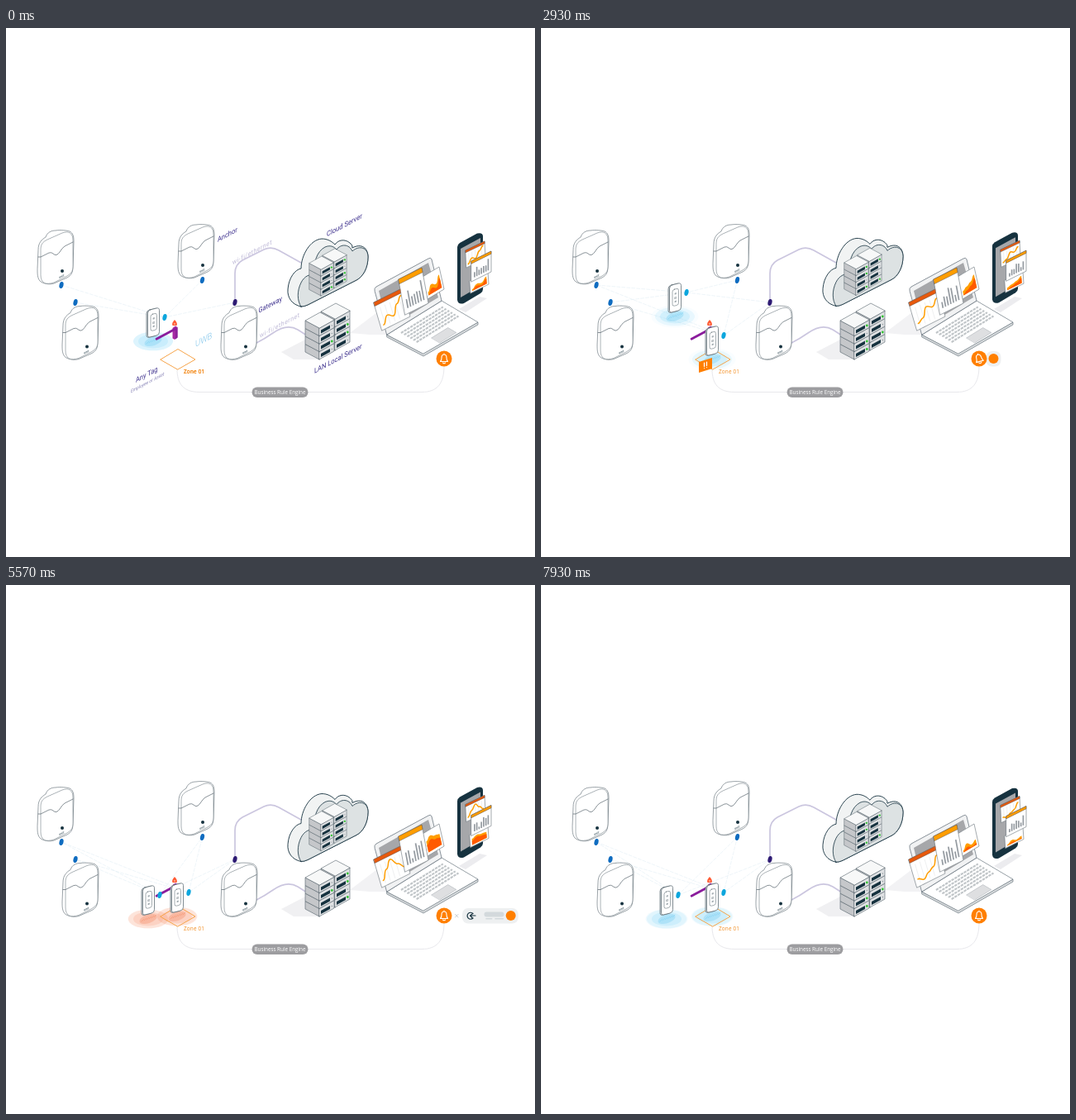
An HTML page for the animation above (8000 ms loop, 640 by 640 pixels).

```html
<!DOCTYPE html>
<html lang="en">
<head>
<meta charset="utf-8">
<title>Zone access diagram</title>
<style>
html, body { margin: 0; width: 100%; height: 100%; overflow: hidden; background: #fff; }
svg { display: block; width: 100vw; height: 100vh; font-family: Roboto, "Open Sans", sans-serif; }
.win * { vector-effect: non-scaling-stroke; }
</style>
</head>
<body>
<svg id="stage" viewBox="0 0 640 640" stroke-linejoin="round" stroke-linecap="round"></svg>
<script>
const LOOP = 8000, BOB_PERIOD = 3465;
const INK = '#56646c', NAVY = '#16323f', ORANGE = '#ff7f00', AMBER = '#ff9d00', RUST = '#e8590c';

const clamp = v => Math.max(0, Math.min(1, v));
const ramp = (t, from, to) => clamp((t - from) / (to - from));
const ease = p => p < .5 ? 2 * p * p : 1 - 2 * (1 - p) ** 2;
const glide = (t, from, to) => ease(ramp(t, from, to));
const mix = (a, b, p) => a + (b - a) * p;
const mixAll = (a, b, p) => a.map((v, i) => mix(v, b[i], p));
const repeat = (n, fn) => Array.from({ length: n }, (_, i) => fn(i)).join('');

const group = (content, attrs) => `<g ${attrs}>${content}</g>`;
const at = (x, y, content) => group(content, `transform="translate(${x} ${y})"`);
const poly = (points, fill, stroke = 'none', width = .8) =>
  `<polygon points="${points}" fill="${fill}" stroke="${stroke}" stroke-width="${width}"/>`;
const path = (d, fill, stroke = 'none', width = 1, extra = '') =>
  `<path d="${d}" fill="${fill}" stroke="${stroke}" stroke-width="${width}" ${extra}/>`;
const disc = (x, y, r, fill) => `<circle cx="${x}" cy="${y}" r="${r}" fill="${fill}"/>`;
const node = (x, y, fill) =>
  `<ellipse cx="${x}" cy="${y}" rx="2.5" ry="4" fill="${fill}" transform="rotate(14 ${x} ${y})"/>`;
const isoText = (x, y, size, fill, text, extra = '') =>
  `<text transform="matrix(.866 -.46 0 1 ${x} ${y})" font-size="${size}" fill="${fill}" ${extra}>${text}</text>`;

// ---- devices ----
const anchor = (x, y) => at(x, y,
  path('M1 24C1 16 5 12 10 9C12 3 17 1 22 1C28 0 36 1 39 2C43 4 44 8 44 14L43 44C43 52 41 55 36 58L20 65C14 67 6 65 3 62C0 58 0 54 0 48Z', '#fff', INK, .6) +
  path('M4 24C4 18 6 15 12 12L30 4C38 1 43 4 43 13V42C43 50 42 52 36 56L20 64C10 67 4 65 4 55Z', '#fff', INK, .5) +
  path('M1 33H4L14 28Q17 27 19 29Q23 33 27 27Q30 22 33 20L43 15', 'none', INK, .7) +
  disc(30, 50, 2, NAVY) +
  `<text transform="matrix(.9 -.35 0 1 26.3 59)" font-size="4" fill="${NAVY}">unit</text>`);

function stack(x, y, seed, t) {
  const layer = i => {
    const b = -9.5 * i, lit = Math.sin(t / 260 + seed * 2.7 + i * 4.1) > .1;
    return poly([0, b, -17, b - 9, -17, b - 18.5, 0, b - 9.5], '#c5c7ca', INK, .6) +
      poly([0, b, 18, b - 10, 18, b - 19.5, 0, b - 9.5], '#dfe1e3', INK, .6) +
      poly([2, b - 2.9, 13, b - 9, 13, b - 13, 2, b - 6.9], NAVY) +
      (lit ? disc(15.3, b - 12.5, 1.4, '#35c335') : disc(15.3, b - 12.5, .7, '#8d979c'));
  };
  return at(x, y, repeat(4, layer) + poly([0, -38, -17, -47, 1, -57, 18, -48], '#f7f8f8', INK, .6));
}
const servers = (seed, t) => stack(19, -11, seed, t) + stack(0, 0, seed + 2, t);

const cloud =
  path('M357 337C346 335 340 326 341 316C342 302 350 292 357 291C357 275 368 256 382 255C389 255 394 258 398 262C402 256 410 255 416 260Q420 263 419 266C430 260 438 266 438 277C438 290 432 301 424 305L365 335Q361 337 357 337Z', '#f1f3f3', NAVY, .9) +
  path('M357 337C352 330 352 318 357 308C361 300 368 297 374 299C371 285 376 270 386 265C393 262 397 265 400 268C405 261 415 261 419 270C428 262 438 266 438 277C438 290 432 301 424 305L365 335Q361 337 357 337Z', '#dde2e3', NAVY, .8);

// ---- charts ----
const TIMES = [0, 1710, 2930, 4570, 5570, 6930, 7930];
const LINES = [[.85, .6, .72, .4, .2], [.85, .55, .8, .45, .3], [.8, .7, .4, .5, .3], [.8, .6, .3, .5, .75],
  [.8, .5, .25, .5, .7], [.8, .5, .25, .45, .6], [.75, .85, .7, .6, .3]];
const AREAS = [[.75, .5, .6, .3], [.8, .5, .6, .3], [.7, .6, .5, .3], [.4, .25, .35, .4],
  [.4, .25, .35, .4], [.45, .25, .4, .4], [.8, .6, .75, .65]];
function sample(frames, t) {
  let i = TIMES.findLastIndex(time => time <= t);
  i = Math.min(i, TIMES.length - 2);
  return mixAll(frames[i], frames[i + 1], glide(t, TIMES[i], TIMES[i + 1]));
}
function smooth(values, shift = 0) {
  const step = .8 / (values.length - 1);
  return values.map((v, i) => {
    const x = .1 + i * step, y = v + shift;
    return i ? `C${x - step / 2} ${values[i - 1] + shift} ${x - step / 2} ${y} ${x} ${y}` : `M${x} ${y}`;
  }).join('');
}
const lineChart = t =>
  repeat(5, i => path(`M${.15 + i * .17} .25V.9`, 'none', '#dcdfe1', .5)) +
  path(smooth(sample(LINES, t)), 'none', AMBER, 1.5);
const barChart = t => repeat(7, i => {
  const h = .25 + .1 * Math.sin(i * 2.2) + .025 * i + .1 * Math.sin(t / 700 + i * 1.3);
  return path(`M${.16 + i * .115} .86v${-h}`, 'none', '#959ba1', 1.7, 'stroke-linecap="butt"');
});
function areaChart(t) {
  const v = sample(AREAS, t);
  return path(smooth(v) + 'V.88H.1Z', AMBER) + path(smooth(v.map(y => Math.min(y + .16, .85))) + 'V.88H.1Z', '#ff5a00');
}
// A unit square carried onto the parallelogram spanned by u and v.
const panel = (x, y, u, v, header, chart) => group(
  path('M0 0H1V1H0Z', '#fff', '#7d868c', .7) + (header ? path('M0 0H1V.13H0Z', header, '#5a4a40', .5) : '') + chart,
  `class="win" transform="matrix(${u} ${v} ${x} ${y})"`);

const onBase = (u, v) => [461 + 66 * u + 44 * v, 371 - 41 * u + 26 * v];
const laptop =
  poly([461, 371, 505, 393, 571, 356, 571, 359, 505, 397, 461, 374], '#d9dcde', '#6b7780', .7) +
  poly([461, 371, 527, 330, 571, 356, 505, 394], '#fff', '#6b7780', .7) +
  repeat(6, i => path(`M${onBase(.15, .16 + i * .085)}L${onBase(.92, .16 + i * .085)}`, 'none', '#c0c5c8', 2.1,
    'stroke-dasharray="3.4 1" stroke-linecap="butt"')) +
  poly([onBase(.35, .7), onBase(.65, .7), onBase(.65, .93), onBase(.35, .93)], '#dedfe1', '#a4abb0', .5) +
  path('M446 318Q445 315 448 313L511 279Q514 277 515 280L527 330L461 371Z', '#f1f2f3', '#6b7780', .8) +
  poly([451, 318, 511, 284, 523, 326, 462, 363], '#a6a7aa');
const laptopPanels = t =>
  panel(504, 301, [20, -12], [6, 27], '', areaChart(t)) +
  panel(445, 332, [34, -17], [10, 34], RUST, lineChart(t)) +
  panel(475, 304, [28, -14], [8, 43], AMBER, barChart(t));

const phone = t =>
  path('M546 265Q546 262 549 260L570 248.5Q577 247 577 252V316Q577 319 574 321L554 333Q547 335 546 329Z', NAVY) +
  poly([550, 267, 574, 254, 574, 312, 550, 326], '#a6a7aa') +
  panel(556, 269, [23, -11], [1, 21], RUST, lineChart(t)) +
  panel(561, 306, [22, -11], [1, 15], '', areaChart(t)) +
  panel(563, 282, [24, -12], [0, 25], AMBER, barChart(t));

// ---- zone, gate and tags ----
function ripple([x, y], t, alarm) {
  const color = `rgb(${mixAll([110, 203, 240], [242, 130, 90], alarm).map(Math.round)})`;
  const pulse = (t / 1100) % 1;
  const ring = (r, opacity) => `<ellipse cx="${x}" cy="${y + 23}" rx="${r}" ry="${r * .47}" fill="${color}" opacity="${opacity}"/>`;
  return ring(24 + 7 * pulse, .12 * (1 - pulse)) + ring(24, .12) + ring(18, .18) +
    group(ring(11, .32), `transform="rotate(-18 ${x} ${y + 23})"`) +
    repeat(6, i => path(`M${x - 8 + i * 3} ${y + 26 - i}l3 -3`, 'none', color, .7, 'opacity=".6"'));
}
const plate = (x, y, w, h, r, fill, width) =>
  `<rect x="${x}" y="${y}" width="${w}" height="${h}" rx="${r}" fill="${fill}" stroke="${INK}" stroke-width="${width}"/>`;
const tag = ([x, y]) => group(
  plate(-8, -16, 14, 33, 3.5, '#dfe3e5', .7) + plate(-6.5, -16, 14, 33, 3.5, '#fff', .7) +
  plate(-3, -10, 7.5, 20, 2.5, '#fff', .5) +
  disc(.7, -4.5, 1.2, '#a4adb2') + disc(.7, 5, 1.2, '#a4adb2') +
  `<text x=".7" y="2" font-size="3.6" text-anchor="middle" fill="${INK}">ID</text>`,
  `transform="matrix(1 -.25 0 1 ${x} ${y})"`) + node(x + 14, y - 6, '#0ca6dd');

const SOURCES = [[67, 311], [84, 332], [237.5, 305], [277, 332]];
const links = ([x, y], t) => SOURCES.map(([sx, sy]) =>
  path(`M${sx} ${sy}L${x + 14} ${y - 6}`, 'none', '#dcebf2', .5,
    `stroke-dasharray="4 2" stroke-dashoffset="${-t / 60}"`)).join('');

function gate(t) {
  const open = glide(t, 900, 1300) - glide(t, 2300, 2600);
  const angle = mix(152, 267, open) * Math.PI / 180, length = mix(26, 22, open);
  const tip = [205 + length * Math.cos(angle), 364 + length * Math.sin(angle)];
  const light = path('M204 353Q208 357 206.5 360H201.5Q200 357 204 353Z', '#ff5b35') + disc(204, 358, 1.1, '#ffb08c');
  return poly([201.5, 363, 205, 360.5, 207.5, 362, 207.5, 374.5, 204, 377, 201.5, 375.5], '#a62aa4') +
    poly([205, 364, 207.5, 362, 207.5, 374.5, 205, 376.5], '#8b2199') +
    path(`M205 364L${tip}`, 'none', '#8b1c9c', 2.8) + group(light, `opacity="${1 - open}"`);
}
const callout = t => group(
  poly([-8, -4, 8, -9, 8, 4, 0, 6.5, -8, 9], ORANGE) +
  path('M-1.5 -3V1.5M1.5 -4V.5M-1.5 3.5V3.6M1.5 2.5V2.6', 'none', '#fff', 1.2),
  `transform="translate(199 408) scale(${glide(t, 2600, 2800) - glide(t, 3200, 3400)})"`);

// ---- alert ----
function alert(t) {
  const x = 530 + 87 * (glide(t, 2519, 3819) - glide(t, 5476, 5976));
  const left = Math.min(552, x - 9), shown = ramp(x, 585, 605), s = clamp(1 - (617 - x) / 20);
  const ring = ramp(t, 2500, 2700) - ramp(t, 3500, 3800);
  const bar = (cx, y, w, h, fill) => `<rect x="${cx - w / 2}" y="${y}" width="${w}" height="${h}" rx="${h / 2}" fill="${fill}"/>`;
  const details = path('M565 397.5A4 4 0 1 0 565 403M568 400H561.5M564 398L561.5 400L564 402.5', 'none', NAVY, 1.2) +
    bar(590.5, 395.5, 35 * s, 6, '#d3d9dc') + bar(590.5 - 9 * s, 403, 12 * s, 1.6, '#d3d9dc') + bar(590.5 + 9 * s, 403, 16 * s, 1.6, '#d3d9dc') +
    path('M543.5 398.5L547 402M547 398.5L543.5 402', 'none', '#c2c8cb', .9);
  const bell = path('M-4.5 3.5Q-3 2 -3 -1Q-3 -5 0 -5Q3 -5 3 -1Q3 2 4.5 3.5ZM-1.5 5Q0 6.5 1.5 5M0 -6V-5', 'none', '#fff', 1.1);
  return (x > 531 ? `<rect x="${left}" y="391" width="${x + 9 - left}" height="18.5" rx="7" fill="#eef0f1"/>` +
      group(details, `opacity="${shown}"`) + disc(x, 400, 6, ORANGE) : '') +
    disc(530, 400, 9.5, ORANGE) +
    group(bell, `transform="translate(530 400) rotate(${-16 * ring * Math.cos((t - 2930) / 70)})"`);
}

// ---- fixed parts ----
const ground =
  poly([333, 392, 362, 377, 379, 401, 348, 401], '#f0f0f2') +
  poly([416, 369, 449, 344, 462, 371, 440, 371], '#f2f2f4') +
  poly([548, 340, 573, 325, 582, 327, 556, 344], '#ececef') +
  path('M207 413C207 430 214 440.5 234 440.5H503C522 440.5 530 430 530 409', 'none', '#e8e8ec', 1) +
  '<rect x="297.5" y="434.5" width="68" height="12.5" rx="6.25" fill="#9d9da0"/>' +
  '<text x="331.5" y="443" font-size="6.3" font-family="Open Sans, sans-serif" text-anchor="middle" fill="#fff">Business Rule Engine</text>';
const cables =
  path('M277 330V297Q277 286 286 281L312 268Q321 264 330 269L357 284', 'none', '#cbc6df', 1.7) +
  path('M303 381Q313 376 323 369Q340 357 353 365L364 372', 'none', '#cbc6df', 1.7);
const anchors = anchor(38, 244) + anchor(208, 237) + anchor(68, 335.5) + anchor(260, 335.5) +
  SOURCES.map(([x, y], i) => node(x, y, i < 3 ? '#0f6cc0' : '#2d1a73')).join('');
const zoneName = weight => `<text x="215" y="418" font-size="6.4" letter-spacing=".15" font-family="Open Sans, sans-serif" font-weight="${weight}" fill="#f28a1c">Zone 01</text>`;
const zone = poly([187, 401, 208, 388.5, 229, 401, 208, 413], 'none', '#f7a54b', 1) + zoneName(500);
const VIOLET = '#3b2e8c', LILAC = '#bdb8d6';
const labels =
  isoText(256, 259, 8.6, VIOLET, 'Anchor') + isoText(388, 252.5, 8.75, VIOLET, 'Cloud Server') +
  isoText(305.5, 345, 8.6, VIOLET, 'Gateway') + isoText(373, 418, 8.7, VIOLET, 'LAN Local Server') +
  isoText(157, 429, 8.6, VIOLET, 'Any Tag') +
  isoText(151, 441.5, 5.8, '#8580b5', 'Employee or Asset', 'font-style="italic"') +
  isoText(274, 286.5, 7.9, LILAC, 'wi-fi/ethernet', 'letter-spacing=".6"') +
  isoText(307, 375, 8, LILAC, 'wi-fi/ethernet', 'letter-spacing=".6"') +
  isoText(229, 386, 10.8, '#7cc3ea', 'UWB', 'font-weight="300"') + zoneName(600);

function scene(t) {
  const bob = Math.cos(2 * Math.PI * t / BOB_PERIOD) - 1;
  const alarm = ramp(t, 5000, 5300) - ramp(t, 6000, 6300);
  const entered = mixAll([178, 356], [207, 378], glide(t, 1200, 2500));
  const refused = mixAll(mixAll([162, 326], [172, 381], glide(t, 3500, 4900)), [152, 381], glide(t, 5900, 6700));
  const fadeIn = `opacity="${ramp(t, 900, 1400)}"`;
  return ground + cables + links(entered, t) + group(links(refused, t), fadeIn) + anchors +
    group(ripple(refused, t, alarm), fadeIn) + ripple(entered, t, alarm) + zone + gate(t) +
    group(tag(refused), fadeIn) + tag(entered) + callout(t) +
    at(0, 1.4 * bob, cloud + group(servers(1, t), 'transform="translate(381 324) scale(.84)"')) +
    at(379, 401, servers(4, t)) +
    laptop + laptopPanels(t) + at(0, 2 * bob, phone(t)) + alert(t) +
    group(labels, `opacity="${1 - ramp(t, 1450, 2700)}"`);
}

const stage = document.getElementById('stage');
function draw() {
  stage.innerHTML = scene(performance.now() % LOOP);
  requestAnimationFrame(draw);
}
draw();
</script>
</body>
</html>
```
